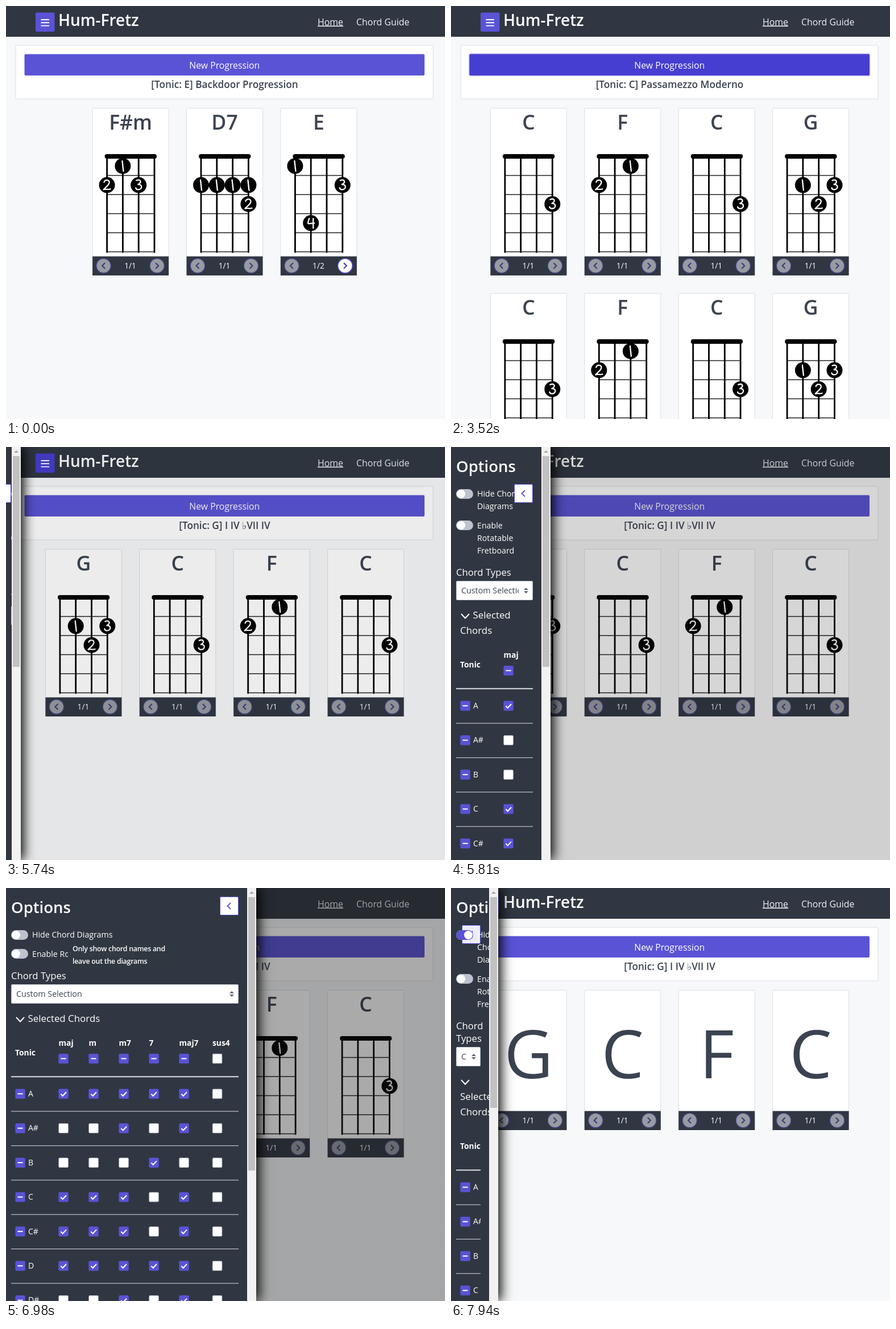
Animation of 772x725 px, one loop 8000 ms. Source, as an HTML page:

```html
<!DOCTYPE html>
<html lang="en">
<head>
<meta charset="utf-8">
<title>Chord progressions</title>
<style>
html, body { margin: 0; width: 100%; height: 100%; overflow: hidden; }
body, svg text { font-family: "Open Sans", "Noto Sans", "DejaVu Sans", sans-serif; }
#stage { position: relative; width: 772px; height: 725px; overflow: hidden; background: #f7f8f9; }
#page { position: absolute; left: 0; top: 0; }
#shade { position: absolute; inset: 0; background: rgb(20, 20, 20); }
#side { position: absolute; left: 0; top: 0; height: 725px; background: #303742; color: #fff; box-shadow: 5px 0 20px #000; }
#body { position: absolute; left: 0; top: 0; right: 16px; height: 725px; box-sizing: border-box; padding: 0 15px 0 9px; overflow: hidden; }
#body > * { position: relative; }
#close { position: absolute; box-sizing: border-box; width: 33px; height: 33px; border: 1px solid #5a53d6; border-radius: 2px; }
#close svg { display: block; }
h2 { margin: 0; height: 71px; font-size: 27.5px; line-height: 68px; font-weight: 600; white-space: nowrap; }
.row { display: flex; gap: 7px; padding-bottom: 11.5px; font-size: 14.2px; line-height: 22px; }
.row span { flex: 1; min-width: 0; }
.toggle { flex: none; position: relative; width: 30px; height: 17px; margin-top: 2.5px; border-radius: 9px; background: #bcc3ce; }
.toggle * { position: absolute; top: 0; height: 17px; border-radius: 9px; }
.toggle b { left: 0; width: 30px; background: #5a53d6; opacity: 0; }
.toggle i { top: 1px; left: 1px; width: 15px; height: 15px; background: #fff; }
.label { margin-top: 5px; font-size: 16.7px; line-height: 22px; }
.select { box-sizing: border-box; height: 34px; margin-top: 4px; padding: 0 24px 0 8px; border: 1px solid #bcc3ce; border-radius: 2px; background: #fff; color: #3b4351; font-size: 14.3px; line-height: 32px; }
.select div { overflow: hidden; white-space: nowrap; }
.select svg { position: absolute; right: 6px; top: 11px; }
.fold { margin-top: 11.5px; padding-left: 7px; font-size: 16.9px; line-height: 27px; }
.fold svg { vertical-align: -3px; }
#table { overflow: hidden; }
#table svg { display: block; }
#bar { position: absolute; right: 0; top: 0; width: 16px; height: 725px; background: #f1f1f1; }
#thumb { position: absolute; left: 2px; top: 16px; width: 12px; background: #c1c1c1; }
#bar svg { position: absolute; left: 4px; top: 5px; }
.tip { position: absolute; box-sizing: border-box; padding: 4px 8px; border-radius: 2px; background: rgba(48, 55, 66, .95); color: #fff; font-size: 12.4px; line-height: 22px; font-weight: 600; letter-spacing: -.02em; white-space: nowrap; }
</style>
</head>
<body>
<div id="stage">
  <svg id="page" width="772" height="725"></svg>
  <div id="shade"></div>
  <div id="side">
    <div id="body">
      <div id="close"><svg width="31" height="31" fill="none" stroke-width="1.8"><path d="M18 10l-5.5 5.5 5.5 5.5"/></svg></div>
      <h2>Options</h2>
      <div class="row"><div class="toggle"><b id="on"></b><i id="knob"></i></div><span>Hide Chord Diagrams</span></div>
      <div class="row"><div class="toggle"><i></i></div><span>Enable Rotatable Fretboard</span></div>
      <div class="label">Chord Types</div>
      <div class="select"><div>Custom Selection</div><svg width="10" height="10" fill="#5d6675"><path d="M1 4l4-4 4 4zM1 6l4 4 4-4z"/></svg></div>
      <div class="fold"><svg width="18" height="14" fill="none" stroke="#fff" stroke-width="2"><path d="M2 3l7 7.5 7-7.5"/></svg> Selected Chords</div>
      <div id="table"></div>
    </div>
    <div id="bar"><div id="thumb"></div><svg width="8" height="6" fill="#a3a3a3"><path d="M0 5l4-4 4 4z"/></svg></div>
  </div>
  <div class="tip" id="tipHide" style="left:109px;width:195px">Only show chord names and<br>leave out the diagrams</div>
  <div class="tip" id="tipTurn" style="left:88px;width:244px">Allows fretboard diagrams to be rotated<br>by dragging across them</div>
</div>
<script>
const LOOP = 8000, TICK = 70;
const PURPLE = '#5a53d6', DARK = '#303742', INK = '#3b4351';
const $ = id => document.getElementById(id);

// Each dot is string, fret, finger.
const CHORDS = {
  'F#m': '122 211 323', D7: '121 221 321 421 432', E: '111 244 423', D: '121 222 323',
  Bm: '143 221 321 421', G: '221 332 423', A: '122 211', B7: '121 221 321 421 232',
  E7: '111 222 423', A7: '211', Em: '421 332 243', Am: '122', C: '433', F: '122 311'
};
const FINGERS = {
  1: 'M-1-9L1 9',
  2: 'M-5-5C-4-10 5-10 4-4C3 1-4 5-6 8C-3 6 2 9 6 7',
  3: 'M-4-8C3-11 7-5-1-1C7-2 7 8-1 8Q-4 8-5 5',
  4: 'M-3-8C-5-2-6 1-4 1L6 0M4-8L4 9'
};
// Start time, heading, chords.
const SONGS = [
  [0, 'E] Backdoor Progression', 'F#m D7 E'],
  [940, 'D] 50s Progression', 'D Bm G A'],
  [1740, 'G] Ragtime Progression', 'B7 E7 A7 D7'],
  [2700, 'G] Circle Progression', 'Em Am D7 G'],
  [3380, 'C] Passamezzo Moderno', 'C F C G C F C G'],
  [4050, 'G] Eight-Bar Blues', 'G D7 C C G D7 G D7'],
  [4860, 'G] I IV ♭VII IV', 'G C F C']
];
const BURSTS = [0, 730, 1740, 2100, 2560, 3240, 4050, 4860, 5270, 5670, 6430, 7260, 7530, 7800];
const PRESSES = [[870, 1010], [1960, 2100], [2630, 2770], [3310, 3450], [4050, 4120], [4860, 4930]];

const ramp = (t, a, b) => Math.min(1, Math.max(0, (t - a) / (b - a)));
const smooth = p => p * p * (3 - 2 * p);
const pulse = (t, a, b, c, d) => ramp(t, a, b) * (1 - ramp(t, c, d));

const text = (x, y, size, str, attrs = '') =>
  `<text x="${x}" y="${y}" font-size="${size}" ${attrs}>${str}</text>`;
const rect = (x, y, w, h, fill, attrs = '') =>
  `<rect x="${x}" y="${y}" width="${w}" height="${h}" fill="${fill}" ${attrs}/>`;
const line = (d, width, color, attrs = '') =>
  `<path d="${d}" fill="none" stroke="${color}" stroke-width="${width}" ${attrs}/>`;
const MID = 'text-anchor="middle"';

function diagram(dots) {
  const sx = n => 26 + (n - 1) * 27.8;
  let frets = '', strings = '';
  for (let i = 1; i <= 5; i++) frets += `M26 ${85 + i * 33.5}H109.4`;
  for (let i = 1; i <= 4; i++) strings += `M${sx(i)} 85V253`;
  return line(frets, 1.4, '#222') + line(strings, 2.8, '#000', 'stroke-linecap="round"') +
    line('M26 85H109.4', 8, '#000', 'stroke-linecap="round"') +
    dots.split(' ').map(([s, f, n]) =>
      `<g transform="translate(${sx(s)} ${68.5 + f * 33.4})"><circle r="14"/>` +
      line(FINGERS[n], 2.3, '#fff', 'stroke-linecap="round" stroke-linejoin="round"') + '</g>').join('');
}

function pager(x, y, dir, active) {
  return `<g transform="translate(${x} ${y})" opacity="${active ? 1 : .5}">` +
    `<circle r="12.7" fill="#fff" stroke="${PURPLE}" stroke-width="1.3"/>` +
    line(`M${-2.5 * dir}-5L${2.5 * dir} 0L${-2.5 * dir} 5`, 2.1, '#4640b8') + '</g>';
}

function card(name, x, y, hidden) {
  const h = hidden ? 246 : 294, two = name === 'E';
  return `<g transform="translate(${x} ${y})">` +
    rect(.5, .5, 134, h - 1, '#fff', 'stroke="#dadee4" rx="1"') +
    (hidden ? text(67.5, 155, 118, name, `${MID} fill="${INK}"`)
      : text(67.5, 38, 35.5, name, `${MID} fill="${INK}" font-weight="600"`) + diagram(CHORDS[name])) +
    rect(.5, h - 33.5, 134, 33.5, DARK) + pager(20, h - 17, -1, false) + pager(114, h - 17, 1, two) +
    text(67, h - 12, 13.6, two ? '1/2' : '1/1', `${MID} fill="#fff"`) + '</g>';
}

function page(t) {
  const [, title, names] = SONGS.filter(s => s[0] <= t).pop();
  const list = names.split(' '), cols = Math.min(4, list.length);
  const hover = pulse(t, 660, 870, 5600, 5740);
  const pressed = PRESSES.some(([a, b]) => t >= a && t < b);
  const button = (fill, attrs) => rect(32.5, 84.5, 703.5, 37.5, fill, 'rx="2" ' + attrs);
  return rect(0, 0, 772, 54, DARK) +
    rect(52, 11.5, 33.5, 33.5, t < 5670 ? PURPLE : '#453ed0', 'rx="2"') +
    line('M61.5 24H76M61.5 29.3H76M61.5 34.6H76', 1.9, '#fff') +
    text(92, 35, 28, 'Hum-Fretz', 'fill="#fff" font-weight="600"') +
    text(548, 33.5, 15.9, 'Home', 'fill="#f0f1f8" text-decoration="underline"') +
    text(616, 33.5, 15.9, 'Chord Guide', 'fill="#f0f1f8"') +
    rect(17, 69, 734, 94, '#fff', 'stroke="#dadee4" rx="1"') +
    (t >= 870 && t < 5670 ? button('none', 'stroke="#dddcf7" stroke-width="4"') : '') +
    button(PURPLE, '') + button(pressed ? '#3e37cd' : '#453ed0', `opacity="${hover}"`) +
    text(384.3, 109.5, 15.8, 'New Progression', `${MID} fill="#fff"`) +
    text(384.5, 144, 17.2, '[Tonic: ' + title, `${MID} fill="${INK}" font-weight="600"`) +
    list.map((n, i) => card(n, 384.5 + (i % 4 - (cols - 1) / 2) * 165.4 - 67.5,
      179 + Math.floor(i / 4) * 325, t >= 6990)).join('');
}

function table() {
  const cols = [92.5, 145.5, 198.5, 251.5, 304.5, 363].map(x => x - 9);
  const rows = { A: '111110', 'A#': '001010', B: '000100', C: '111010', 'C#': '111010', D: '111110', 'D#': '001010' };
  const marks = { dash: 'M4 8.5H13', check: 'M3.8 8.8L7.2 12.2L13.5 5.5' };
  const box = (x, y, kind) => `<g transform="translate(${x} ${y - 8.5})">` +
    rect(.3, .3, 16.5, 16.5, kind ? PURPLE : '#fff', `rx="1.5" stroke="${kind ? PURPLE : '#bcc3ce'}" stroke-width=".8"`) +
    (kind ? line(marks[kind], 2, '#fff') : '') + '</g>';
  const bold = 'fill="#fff" font-weight="700"';
  let out = text(7, 51.5, 13.8, 'Tonic', bold) + line('M0 89.3H401', 2, '#dadee4');
  ['maj', 'm', 'm7', '7', 'maj7', 'sus4'].forEach((n, i) => {
    out += text(cols[i], 34.5, 13.8, n, bold) + box(cols[i], 57.5, i < 5 && 'dash');
  });
  Object.keys(rows).forEach((n, r) => {
    const y = 119.3 + r * 60.4;
    out += box(7.5, y, 'dash') + text(30, y + 4.7, 14, n, 'fill="#fff"') +
      line(`M0 ${y + 30.7}H401`, 1, '#dadee4');
    cols.forEach((x, i) => out += box(x, y, rows[n][i] === '1' && 'check'));
  });
  return `<svg width="401" height="520">${out}</svg>`;
}

function tip(el, top, amount) {
  el.style.opacity = amount;
  el.style.top = top + 3 * amount + 'px';
}

let shown = '';
function draw(now) {
  const time = now % LOOP;
  const start = BURSTS.filter(b => b <= time).pop();
  const t = start + Math.floor((time - start) / TICK) * TICK;

  const html = page(t);
  if (html !== shown) $('page').innerHTML = shown = html;

  const width = 440 * smooth(ramp(t, 5704, 5950)) * (1 - smooth(ramp(t, 7800, 7994)));
  $('side').style.display = width ? '' : 'none';
  $('side').style.width = width + 'px';
  $('shade').style.opacity = .36 * pulse(t, 5680, 5950, 7800, 7930);
  $('thumb').style.height = (width > 300 ? 480 : 370) + 'px';

  const close = $('close').style, closing = t >= 7800 && t < 7870;
  close.left = Math.max(9, width - 31) - 33 + 'px';
  close.top = (width < 180 ? 65 : 15) + 'px';
  close.background = closing ? '#938fe2' : t >= 7870 ? '#ececfb' : '#fff';
  close.stroke = closing ? '#b7b5ed' : t >= 7530 ? '#3a33c4' : PURPLE;

  const on = ramp(t, 6950, 7100);
  $('on').style.opacity = on;
  $('knob').style.left = 1 + 13 * on + 'px';

  tip($('tipTurn'), 122, pulse(t, 6370, 6570, 6640, 6840));
  tip($('tipHide'), 88.5, pulse(t, 6680, 6880, 7170, 7330));
  requestAnimationFrame(draw);
}

$('table').innerHTML = table();
draw(0);
</script>
</body>
</html>
```
